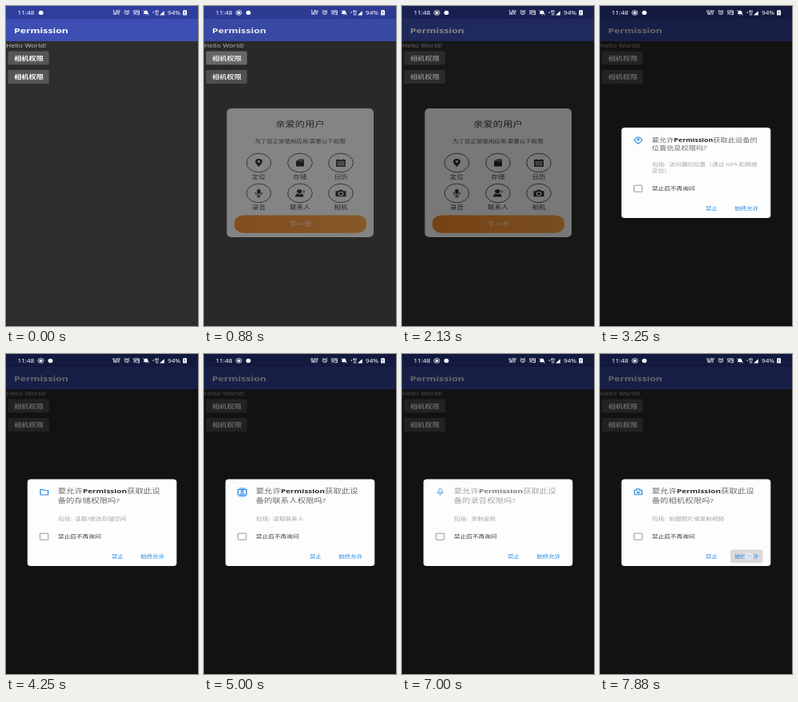
Recreate the animation shown at these times as an HTML page. Size 240 by 400 pixels, loop 8 s.

```html
<!DOCTYPE html>
<html lang="zh-CN">
<head>
<meta charset="utf-8">
<title>Permission</title>
<style>
html, body { margin: 0; width: 100%; height: 100%; overflow: hidden; background: #2d2d2d; }
svg { display: block; width: 100vw; height: 100vh; }
text { font-family: "Noto Sans", "Noto Sans CJK SC", "Noto Sans CJK", sans-serif; white-space: pre; }
</style>
</head>
<body>
<svg id="stage" viewBox="0 0 240 400" preserveAspectRatio="none"></svg>
<script>
const LOOP = 8000, STEP = 125;
const WIDE = 1.3; // the phone screen is squeezed vertically
const BLUE = '#1e88e5';

// Text centred vertically on cy
const label = (x, cy, size, str, fill, extra = '') =>
  `<text transform="translate(${x} ${cy + size * 0.38}) scale(${WIDE} 1)" font-size="${size}" fill="${fill}" ${extra}>${str}</text>`;
const mid = 'text-anchor="middle"';
const rect = (x, y, w, h, fill, extra = '') =>
  `<rect x="${x}" y="${y}" width="${w}" height="${h}" fill="${fill}" ${extra}/>`;
const at = (x, y, body, extra = '') =>
  `<g transform="translate(${x} ${y}) scale(${WIDE} 1)" ${extra}>${body}</g>`;

// Glyphs about 9 units high, centred on 0,0
const solid = {
  pin: '<path fill-rule="evenodd" d="M0 5C-2 2-3.4 .5-3.4-1.5A3.4 3.4 0 0 1 3.4-1.5C3.4 .5 2 2 0 5ZM0-2.8A1.3 1.3 0 1 0 0-.2A1.3 1.3 0 1 0 0-2.8Z"/>',
  card: '<path d="M-1-4.6H3.2Q3.8-4.6 3.8-4V4Q3.8 4.6 3.2 4.6H-3.2Q-3.8 4.6-3.8 4V-1.8Z"/><path d="M-.8-3.4v1.8M.8-3.4v1.8M2.4-3.4v1.8" stroke="#fdfdfd" stroke-width=".7"/>',
  calendar: '<path d="M-4.2-3.6H4.2V4.4H-4.2ZM-2.5-4.8v1.5M2.5-4.8v1.5" stroke="#111" stroke-width=".8"/><path d="M-4-1.5H4M-4 .5H4M-4 2.5H4M-2-1.5V4M0-1.5V4M2-1.5V4" stroke="#fdfdfd" stroke-width=".5"/>',
  mic: '<rect x="-1.7" y="-5" width="3.4" height="6" rx="1.7"/><path d="M-3.1-1V-.4A3.1 3.1 0 0 0 3.1-.4V-1M0 2.8V4.8M-1.8 4.8H1.8" fill="none" stroke="#111" stroke-width=".9"/>',
  person: '<circle cx="-.6" cy="-2.3" r="2.4"/><path d="M-4.6 4.4Q-4.4 .8-1.6 .6L-.6 1.8L.6 .6Q3.4 .8 3.6 4.4Z"/><path d="M2.6-3.4q1.2 1.2 0 2.4M3.6-4.2q1.8 1.9 0 4" fill="none" stroke="#111" stroke-width=".6"/>',
  camera: '<path d="M-5-2.7H-2.4L-1.5-4.2H1.5L2.4-2.7H5V4.2H-5Z"/><circle cy=".7" r="2.2" fill="none" stroke="#fdfdfd" stroke-width=".9"/>'
};
const line = {
  pin: '<path d="M0 4.5L-2.7 1.4A3.3 3.3 0 1 1 2.7 1.4Z"/><circle cy="-1" r=".9"/>',
  folder: '<path d="M-3.7-3.2H-1L0-2.1H3.7V3.2H-3.7Z"/>',
  contact: '<path d="M-4.1-3.2H4.1V3.2H-4.1ZM-3.2-4.8H3.2M-3.2 4.8H3.2"/><circle cy="-1" r="1"/><path d="M-2 2.3Q0 .4 2 2.3"/>',
  calendar: '<path d="M-3.4-3.2H3.4V3.6H-3.4ZM-3.4-1H3.4M-2-4.4V-3M2-4.4V-3"/>',
  mic: '<rect x="-1.4" y="-4.4" width="2.8" height="5.2" rx="1.4"/><path d="M-2.8-.6Q-2.8 2.4 0 2.4T2.8-.6M0 2.4V4.4"/>',
  camera: '<path d="M-3.5-2.4H-1.5V-3.9H1.5V-2.4H3.5V3.1H-3.5Z"/><circle cy=".3" r="1.1"/>'
};

// One entry per system question; tap = moment it is allowed
const perms = [
  { icon: 'pin', ask: ['获取此设备的', '位置信息权限吗?'], info: ['访问确切位置（通过 GPS 和网络', '定位）'], tap: 3600, tall: true },
  { icon: 'folder', ask: ['获取此设', '备的存储权限吗?'], info: ['读取/修改存储空间'], tap: 4400 },
  { icon: 'contact', ask: ['获取此设', '备的联系人权限吗?'], info: ['读取联系人'], tap: 5800 },
  { icon: 'calendar', ask: ['获取此设', '备的日历权限吗?'], info: ['新建/修改/删除日历'], tap: 6500 },
  { icon: 'mic', ask: ['获取此设', '备的录音权限吗?'], info: ['录制音频'], tap: 7150 },
  { icon: 'camera', ask: ['获取此设', '备的相机权限吗?'], info: ['拍摄照片或录制视频'], tap: 7820 }
];

const appButton = (y, id) =>
  rect(2.4, y + 0.7, 51.4, 17.2, '#222', 'rx="1.3"') +
  rect(2.4, y, 51.4, 17.2, '#565656', `rx="1.3" id="${id}"`) +
  label(28.5, y + 8.6, 7.05, '相机权限', '#fff', mid + ' font-weight="700"');

const choice = (x, y, icon, name) =>
  `<ellipse cx="${x}" cy="${y}" rx="15.3" ry="11.8" fill="none" stroke="#333" stroke-width=".9"/>` +
  at(x, y, solid[icon], 'fill="#111"') + label(x, y + 17.6, 6.5, name, '#222', mid);

const welcome = `<g id="welcome">
  ${rect(28.5, 128, 183.5, 161, '#fdfdfd', 'rx="6" ry="5"')}
  ${label(120, 147, 9.5, '亲爱的用户', '#222', mid)}
  ${label(120, 169, 5.7, '为了您正常使用应用,需要以下权限', '#333', mid)}
  ${choice(68.5, 196, 'pin', '定位')}${choice(120, 196, 'card', '存储')}${choice(171, 196, 'calendar', '日历')}
  ${choice(68.5, 234, 'mic', '录音')}${choice(120, 234, 'person', '联系人')}${choice(171, 234, 'camera', '相机')}
  ${rect(38, 261.5, 165, 22.2, 'url(#orange)', 'rx="12" ry="9.5"')}
  ${rect(38, 261.5, 165, 22.2, '#fff', 'rx="12" ry="9.5" id="nextPress"')}
  ${label(120.5, 272.7, 7.35, '下一步', '#fff', mid)}
</g>`;

const question = (p, i) => {
  const size = p.tall ? 7.1 : 8, y = p.tall ? 167.5 : 171.4, gap = p.tall ? 9.4 : 11.7;
  const app = `<tspan font-weight="700" fill="#2a2a2a" font-size="${size * 0.96}">Permission</tspan>`;
  const infoY = p.tall ? 197.6 : 206;
  return `<g id="ask${i}">
    ${at(47.8, y + (p.tall ? 0.4 : 1.3), line[p.icon], `fill="none" stroke="${BLUE}" stroke-width=".95"`)}
    ${label(64.7, y, size, '要允许' + app + p.ask[0], '#6a6a6a')}
    ${label(64.7, y + gap, size, p.ask[1], '#6a6a6a')}</g>
  <g id="info${i}">${p.info.map((s, n) =>
    label(65, infoY + n * 7.8, 5.9, (n ? '' : '包括:  ') + s, '#a2a2a2')).join('')}</g>`;
};

const system = `<g id="system">
  ${rect(26.8, 156.5, 186.5, 108.5, '#fdfdfd', 'rx="4.5" ry="3.5" id="sheet"')}
  ${perms.map(question).join('')}
  ${rect(42.5, 224.2, 10.3, 8, 'none', 'rx=".6" stroke="#8c8c8c" stroke-width=".9"')}
  ${label(65, 228.2, 5.9, '禁止后不再询问', '#333')}
  ${rect(163, 244.5, 40.5, 16.8, '#dadada', 'rx="3" ry="2.5" id="allowPress"')}
  ${label(139.5, 253.2, 5.8, '禁止', BLUE, mid + ' font-weight="500"')}
  ${label(183.2, 253.2, 5.8, '始终允许', BLUE, mid + ' font-weight="500"')}
</g>`;

const status = `
  ${label(14.5, 8.4, 6.3, '11:48', '#fff')}
  <g id="eye"><ellipse cx="43.5" cy="8.4" rx="3.6" ry="2.9" fill="none" stroke="#fff" stroke-width=".8"/>
  <ellipse cx="43.5" cy="8.4" rx="2" ry="1.6" fill="#fff"/></g>
  <ellipse id="badge" cy="8.4" rx="2.9" ry="2.7" fill="#fff"/>
  <text id="speed" transform="translate(138 7.8) scale(${WIDE} 1)" font-size="3.75" font-weight="700" fill="#fff" ${mid}></text>
  ${label(138, 10.4, 2.6, 'KB/S', '#fff', mid + ' font-weight="700"')}
  ${at(151, 8.3, '<circle r="2.1"/><path d="M0-1.3V.2L1 .8M-2.5-2.2L-1.3-3.1M2.5-2.2L1.3-3.1"/>', 'fill="none" stroke="#fff" stroke-width=".7"')}
  ${at(163, 8.3, '<path d="M-2.7-1V-2.4H2.7V2.4H.6M-2.7 2.4h.4M-2.7 .8q1.5 0 1.5 1.6M-2.7-.5q2.7 0 2.7 2.9"/><path d="M-1-1H1.6V1"/>', 'fill="none" stroke="#fff" stroke-width=".7"')}
  ${at(175, 8.3, '<path d="M-2.6 1.8Q-1.8 1-1.8-.8Q-1.6-2.7 0-2.7T1.8-.8Q1.8 1 2.6 1.8ZM-.7 2.4H.7V3H-.7Z" fill="#fff"/><path d="M-2.8-2.8L2.8 3" stroke="#fff" stroke-width=".7"/>')}
  <circle cx="184.2" cy="8" r=".8" fill="#fff"/>
  ${label(188.6, 6.5, 3, '4G', '#fff', mid + ' font-weight="700"')}
  <path d="M186.8 9.3h3.6M186.8 11h3.6" stroke="#fff" stroke-width=".7"/>
  <path d="M192 11.4L197.8 6.2V11.4Z" fill="#fff"/>
  ${label(202, 8.4, 6.3, '94%', '#fff')}
  <path d="M221.2 5.6h1.3V4.9h2.2v.7h1.3V11.6h-4.8Z" fill="#fff"/>
  <path d="M223.6 6.6v2.2M223.6 9.6v.9" stroke="#1b2350" stroke-width=".9"/>`;

const stage = document.getElementById('stage');
stage.innerHTML = `
  <defs><linearGradient id="orange"><stop stop-color="#f97c10"/><stop offset="1" stop-color="#fd9a2b"/></linearGradient></defs>
  ${rect(0, 0, 240, 400, '#2d2d2d')}
  ${rect(0, 15.8, 240, 28.2, '#3d4fb3')}
  ${rect(0, 0, 240, 15.8, '#303f9f')}
  ${label(10, 30.8, 9.45, 'Permission', '#fff', 'font-weight="700"')}
  ${label(0, 49, 6.7, 'Hello World!', '#bcbcbc')}
  ${appButton(56.4, 'first')}${appButton(80.1, 'second')}
  ${rect(0, 0, 240, 400, '#000', 'id="dim"')}
  ${status}${welcome}${system}
  <ellipse id="finger" rx="6.4" ry="5" fill="#f4f4f4" stroke="#ccc" stroke-width=".5"/>`;

const el = {};
stage.querySelectorAll('[id]').forEach(n => el[n.id] = n);

const clamp = v => Math.max(0, Math.min(1, v));
const ramp = (t, a, b) => clamp((t - a) / (b - a));
const fade = (id, v) => el[id].setAttribute('opacity', v.toFixed(3));
// Straight lines through [time, value] points
const track = (t, pts) => pts.reduce((v, [time, to], i) =>
  i ? v + (to - pts[i - 1][1]) * ramp(t, pts[i - 1][0], time) : to, 0);
const press = (t, from, hold) => ramp(t, from - 10, from + 50) * (1 - ramp(t, from + hold, from + hold + 160));

const taps = [[250, 32, 66], [1830, 173, 269.5], ...perms.map(p => [p.tap, 186, 253])];

function draw(now) {
  const t = Math.floor(now % LOOP / STEP) * STEP;

  fade('dim', track(t, [[850, 0], [1030, 0.6], [2080, 0.6], [2220, 0.25], [2380, 0.6]]));
  fade('welcome', track(t, [[780, 0], [1000, 1], [2050, 1], [2180, 0]]));
  fade('system', ramp(t, 2240, 2380));
  fade('nextPress', 0.18 * press(t, 1830, 100));

  const top = track(t, [[3850, 152], [4000, 156.5]]);
  el.sheet.setAttribute('y', top);
  el.sheet.setAttribute('height', 265 - top);

  const lit = Math.round(86 + 26 * press(t, 250, 680));
  el.first.setAttribute('fill', `rgb(${lit},${lit},${lit})`);

  const started = t >= 250;
  fade('eye', started ? 1 : 0);
  el.badge.setAttribute('cx', started ? 55.5 : 43.7);
  el.speed.textContent = t < 3250 ? '1.82' : t < 5250 ? '0.03' : '0.00';

  let allow = 0;
  perms.forEach((p, i) => {
    const prev = i ? perms[i - 1].tap : -1000;
    const last = i === perms.length - 1;
    const shown = t >= prev + 300 && (last || t < p.tap + 300);
    const leave = last ? 0 : ramp(t, p.tap + 120, p.tap + 290);
    fade('info' + i, shown ? 1 : 0);
    fade('ask' + i, shown ? ramp(t, prev + 380, prev + 580) * (1 - leave) : 0);
    allow = Math.max(allow, press(t, p.tap, 150));
  });
  fade('allowPress', allow);

  const tap = taps.find(([s]) => t >= s && t < s + 180);
  fade('finger', tap ? 0.6 : 0);
  if (tap) {
    el.finger.setAttribute('cx', tap[1]);
    el.finger.setAttribute('cy', tap[2]);
  }
}

const start = performance.now();
function tick() {
  draw(performance.now() - start);
  requestAnimationFrame(tick);
}
tick();
</script>
</body>
</html>
```
